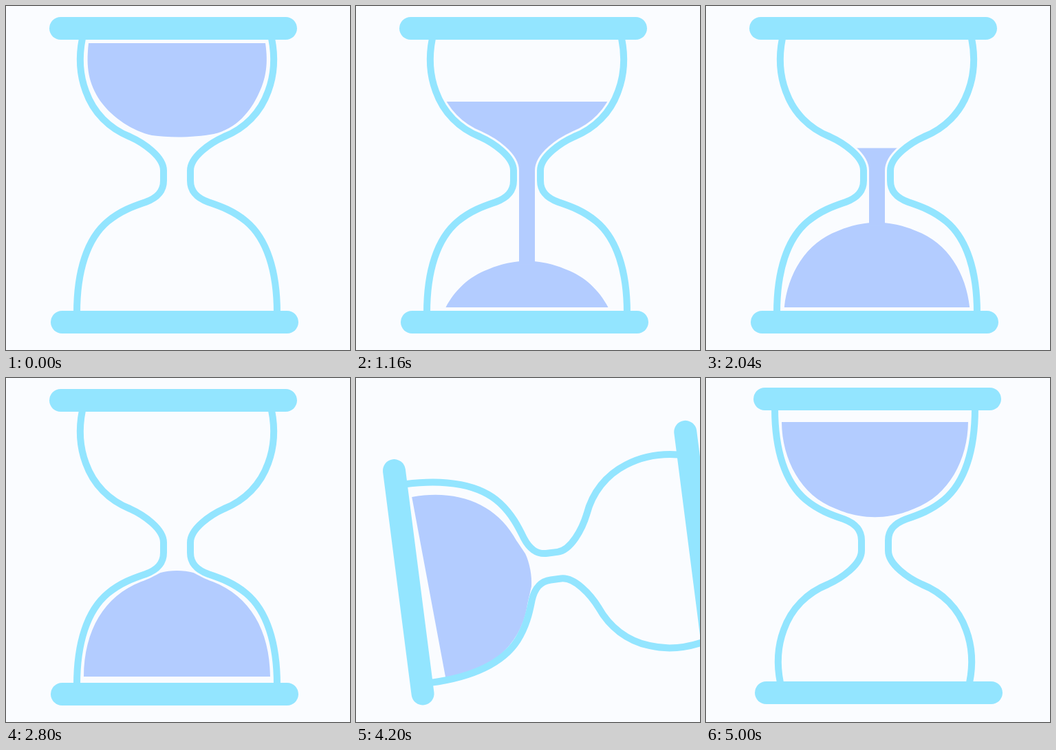
An HTML page for the animation above (5240 ms loop, 500x500 px).

```html
<!DOCTYPE html>
<html lang="en">
<head>
<meta charset="utf-8">
<title>Hourglass</title>
<style>
  html, body { margin: 0; width: 100%; height: 100%; overflow: hidden; background: #fafcff; }
  svg { display: block; width: 100vw; height: 100vh; }
  .sand { fill: #b3ccff; }
  .bar { fill: #93e5ff; }
  .gap, .wall { fill: none; }
  .gap { stroke: #fafcff; stroke-width: 16; }
  .wall { stroke: #93e5ff; stroke-width: 10; }
</style>
</head>
<body>
<svg viewBox="0 0 500 500">
  <defs>
    <path id="side" d="M111 47C106 72 107 100 116 124C127 155 150 178 180 190C200 199 229 219 229 239V254C229 270 219 279 203 285C185 291 166 298 148 313C118 338 103 385 103 446"/>
    <g id="sides">
      <use href="#side"/>
      <use href="#side" transform="translate(497 0) scale(-1 1)"/>
    </g>
    <clipPath id="upper"><path d="M111 47C106 72 107 100 116 124C127 155 150 178 180 190C200 199 229 219 229 239V250H268V239C268 219 297 199 317 190C347 178 370 155 381 124C390 100 391 72 386 47Z"/></clipPath>
    <clipPath id="lower"><path d="M229 250V254C229 270 219 279 203 285C185 291 166 298 148 313C118 338 103 385 103 438H394C394 385 379 338 349 313C331 298 312 291 294 285C278 279 268 270 268 254V250Z"/></clipPath>
  </defs>

  <g id="flow">
    <g clip-path="url(#upper)">
      <path id="top" class="sand" d="M120 54C116 90 120 112 137 138C155 163 185 182 212 188C240 192 275 191 302 186C335 179 356 152 367 128C381 100 380 75 377 54Z"/>
    </g>
    <g clip-path="url(#lower)"><path id="pile" class="sand"/></g>
    <use href="#sides" class="gap"/>
    <rect id="stream" class="sand" x="237" width="23"/>
  </g>
  <path id="rest" class="sand"/>
  <g id="glass">
    <use href="#sides" class="wall"/>
    <rect class="bar" x="63" y="16" width="360" height="33" rx="16.5"/>
    <rect class="bar" x="65" y="443" width="360" height="33" rx="16.5"/>
  </g>
</svg>
<script>
  const LOOP = 5240, STEP = 40, DRAINED = 2800;
  const $ = id => document.getElementById(id);
  const clamp = (v, a = 0, b = 1) => Math.min(b, Math.max(a, v));
  const mix = (a, b, k) => a + (b - a) * k;
  const show = (el, on) => el.setAttribute('visibility', on ? 'visible' : 'hidden');
  const move = (el, v) => el.setAttribute('transform', v);

  // cubic-bezier(.25, .1, .25, 1)
  function ease(x) {
    if (x <= 0) return 0;
    if (x >= 1) return 1;
    let lo = 0, hi = 1;
    for (let i = 0; i < 30; i++) {
      const s = (lo + hi) / 2, r = 1 - s;
      if (0.75 * s * r + s ** 3 < x) lo = s; else hi = s;
    }
    const s = lo, r = 1 - s;
    return 0.3 * s * r * r + 3 * s * s * r + s ** 3;
  }

  // Half turn about an off-centre pivot that slides so the glass lands in place.
  const mid = { x: 247, y: 245 }, off = { x: -28.6, y: 41.3 };
  const spin = p => `translate(${-2 * off.x * p} ${-2 * off.y * p}) ` +
                    `rotate(${180 * p} ${mid.x + off.x} ${mid.y + off.y})`;

  // Right half of the heap about its centre: full against the neck, then settled.
  const full = [[135.5, 77], [135, 10], [106, -40], [52, -61], [40, -65], [32, -70], [24, -74], [10, -78]];
  const settled = [[135.5, 69], [135, 15], [108, -38], [57, -57], [45, -62], [36, -65], [24, -67], [8, -70]];

  function heap(k, foot = 0) {
    const p = full.map(([x, y], i) => [mix(x, settled[i][0], k), mix(y, settled[i][1], k)]);
    const q = p.map(([x, y]) => [-x, y]).reverse();
    const base = p[0][1] + foot;
    return `M${p[0][0]} ${base}L${p[0]}C${p.slice(1, 7).join(' ')}` +
           `C${[p[7], ...q.slice(0, 2)].join(' ')}C${q.slice(2).join(' ')}V${base}Z`;
  }

  $('pile').setAttribute('d', heap(1, 60));

  function draw(now) {
    const t = Math.floor((now % LOOP) / STEP) * STEP;
    const flowing = t < DRAINED;
    show($('flow'), flowing);
    show($('rest'), !flowing);

    if (flowing) {
      const level = 54 + 0.0766 * Math.max(0, t - 50) + 0.06 * Math.max(0, t - 2400);
      const crest = Math.max(280, 440 - 0.0636 * Math.max(0, t - 76));
      move($('top'), `translate(0 ${level - 54})`);
      move($('pile'), `translate(248.5 ${crest + 69})`);
      const head = Math.min(crest + 4, 438, 190 + 0.62 * (t - 40));
      const from = Math.max(level, 225);
      $('stream').setAttribute('y', from);
      $('stream').setAttribute('height', Math.max(0, head - from));
    } else {
      $('rest').setAttribute('d', heap(clamp((t - 3909) / 1091)));
      move($('rest'), `${spin(ease((t - 3909) / 1098))} translate(248.5 357)`);
    }
    move($('glass'), spin(ease((t - 3904) / 1082)));
  }

  const start = performance.now();
  function tick() {
    draw(performance.now() - start);
    requestAnimationFrame(tick);
  }
  tick();
</script>
</body>
</html>
```
